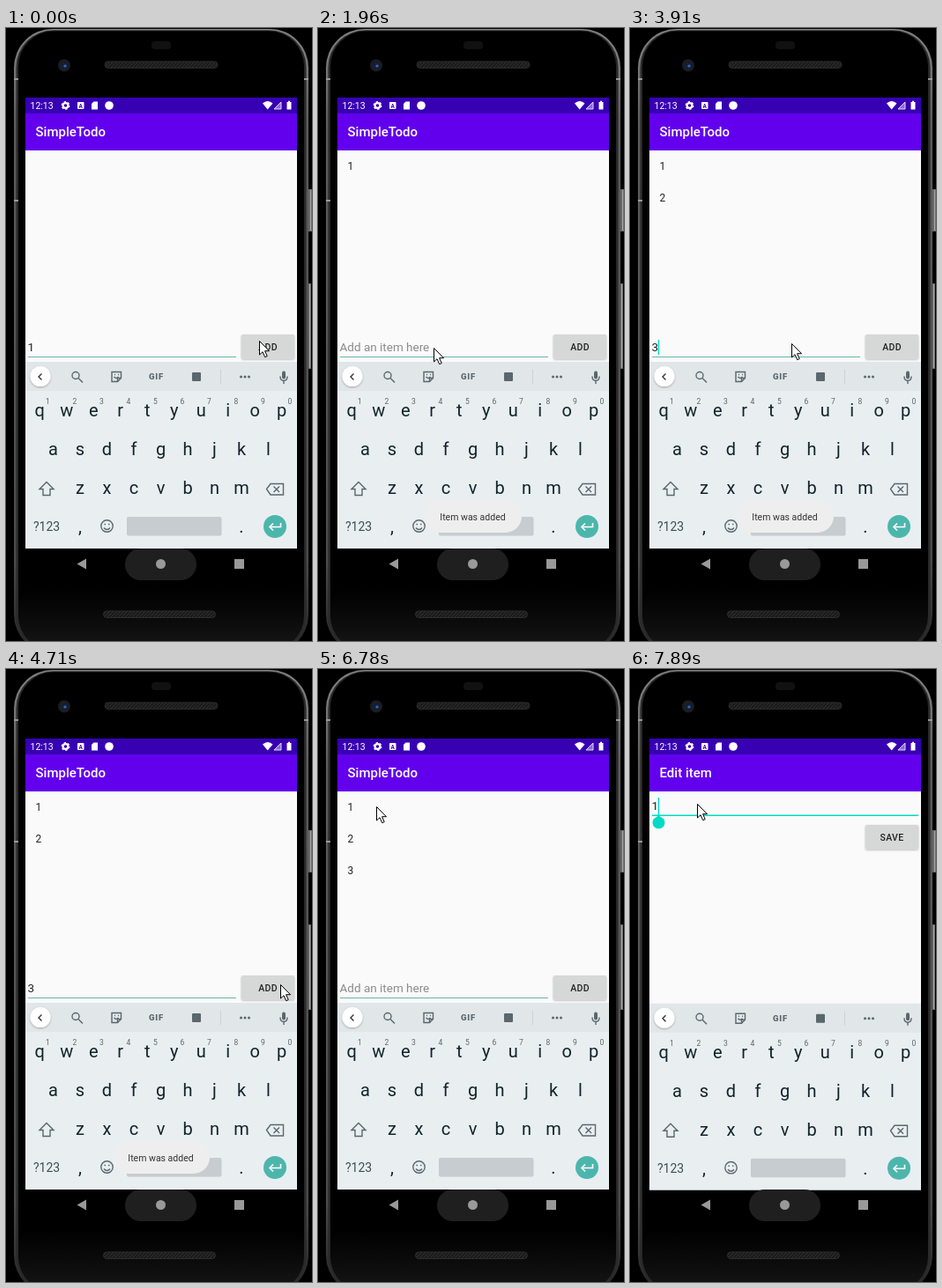
Animation of 347x696 px, one loop 8 s. Source, as an HTML page:

```html
<!DOCTYPE html>
<html lang="en">
<head>
<meta charset="utf-8">
<title>Todo app demo</title>
<style>
html, body { margin: 0; width: 100%; height: 100%; overflow: hidden; background: #000; }
svg { display: block; width: 347px; height: 696px; font-family: Roboto, sans-serif; }
.mid { text-anchor: middle; }
.btn { font-weight: 500; font-size: 10.5px; letter-spacing: .3px; text-anchor: middle; fill: #222; }
.title { font-weight: 500; font-size: 15px; fill: #fff; }
.input { font-size: 13.5px; fill: #222; }
.line { fill: none; stroke: #5a676d; stroke-width: 1.4; }
</style>
</head>
<body>
<svg viewBox="0 0 347 696">
  <defs>
    <clipPath id="screen"><path d="M22 79H330V603H22Z"/></clipPath>
    <clipPath id="keysArea"><path d="M22 79H330V592H22Z"/></clipPath>
    <linearGradient id="rim" x2="0" y2="1">
      <stop offset="0" stop-color="#858585"/><stop offset=".15" stop-color="#5c5c5c"/>
      <stop offset=".85" stop-color="#4a4a4a"/><stop offset="1" stop-color="#222"/>
    </linearGradient>
    <linearGradient id="face" x2="0" y2="1">
      <stop offset=".9" stop-color="#000"/><stop offset="1" stop-color="#161616"/>
    </linearGradient>
    <pattern id="mesh" width="4" height="4" patternUnits="userSpaceOnUse">
      <path d="M0 0H4V4H0Z" fill="#1b1b1b"/><path d="M0 4L4 0" stroke="#303030"/>
    </pattern>
    <filter id="soft" x="-20%" y="-20%" width="140%" height="150%">
      <feDropShadow dx="0" dy="1" stdDeviation=".8" flood-opacity=".3"/>
    </filter>
    <g id="bars">
      <path d="M22 79H330V591H22Z" fill="#fafafa"/>
      <path d="M22 79H330V139H22Z" fill="#6200ee"/>
      <path d="M22 79H330V97H22Z" fill="#3700b3"/>
    </g>
  </defs>

  <!-- phone -->
  <path d="M0 0H347V696H0Z"/>
  <path d="M343 183h4v48h-4zM342 290h4v97h-4z" fill="#6a6a6a"/>
  <path d="M345.5 184v46M344.5 291v95" stroke="#aaa"/>
  <rect x="9" y="1" width="334" height="709" rx="44" fill="url(#rim)"/>
  <rect x="11.5" y="2.5" width="329" height="706" rx="42" fill="#2a2a2a"/>
  <rect x="14" y="3.5" width="324" height="704" rx="40" fill="url(#face)"/>
  <path d="M9 58h5M9 196h5M338 58h5" stroke="#999" stroke-width="2"/>
  <rect x="165" y="15" width="22" height="9" rx="4" fill="#111"/>
  <rect x="112" y="38" width="128" height="7.5" rx="3.7" fill="url(#mesh)" stroke="#2c2c2c"/>
  <rect x="110.5" y="662" width="127" height="7.5" rx="3.7" fill="url(#mesh)" stroke="#2c2c2c"/>
  <circle cx="66" cy="42.5" r="7" fill="#1d1d1f"/>
  <circle cx="66" cy="42.5" r="3.8" fill="#10203f"/><circle cx="67" cy="43" r="1.6" fill="#3f66b5"/>

  <g clip-path="url(#screen)">
    <g id="list">
      <use href="#bars"/>
      <text class="title" x="33.5" y="123">SimpleTodo</text>
      <g id="items" font-size="12" fill="#222"></g>
      <text id="entry" class="input" x="24.5" y="367"></text>
      <path d="M25 373.5H261" stroke="#66b5af"/>
      <path id="caret" d="M32.5 354V371" stroke="#03dac5" stroke-width="1.5"/>
      <rect id="add" x="267" y="348" width="60" height="27.5" rx="1.5" fill="#d6d7d7" filter="url(#soft)"/>
      <text class="btn" x="297" y="365.5">ADD</text>
    </g>
    <g id="edit">
      <path d="M22 590H330V627H22Z"/>
      <use href="#bars"/>
      <text class="title" x="33.5" y="123">Edit item</text>
      <text class="input" x="24.5" y="160">1</text>
      <path id="rule" d="M25 166.3H327"/>
      <path id="editCaret" d="M32.5 146V166" stroke="#03dac5" stroke-width="1.5"/>
      <path id="handle" d="M32.5 166.5L38 170A7 7 0 1 1 27 170Z" fill="#03dac5"/>
      <rect x="267" y="177" width="60" height="27.5" rx="1.5" fill="#d6d7d7" filter="url(#soft)"/>
      <text class="btn" x="297" y="194.5">SAVE</text>
    </g>
  </g>

  <!-- status icons -->
  <g fill="#fff">
    <text x="27.5" y="92" font-size="10.5">12:13</text>
    <circle cx="67.5" cy="88" r="2.9" fill="none" stroke="#fff" stroke-width="2.2"/>
    <circle cx="67.5" cy="88" r="4.2" fill="none" stroke="#fff" stroke-width="1.4" stroke-dasharray="2.2 2.2"/>
    <rect x="81" y="84" width="7.5" height="8" rx="1"/>
    <text class="mid" x="84.7" y="90.5" font-size="6.5" font-weight="700" fill="#3700b3">A</text>
    <path d="M99.500 83.500H104V92.500H97V86Z"/>
    <circle cx="117" cy="88" r="4.8"/>
    <path d="M291 85.5Q296.700 80.500 302.500 85.500L296.700 92.500ZM318.500 84h1.500v-1.200h2V84h1.500v8.500h-5z"/>
    <path d="M304 92L312 84V92Z" fill="#8a6ad2" stroke="#fff" stroke-width=".8"/>
  </g>

  <g clip-path="url(#keysArea)">
    <g id="keyboard">
      <path d="M22 379H330V591H22Z" fill="#e9eef1"/>
      <path d="M22 379H330V412H22Z" fill="#e1e6e9"/>
      <circle cx="39" cy="395.5" r="11.5" fill="#fff" filter="url(#soft)"/>
      <g class="line">
        <path d="M40.5 392.5L37 396L40.5 399.5" stroke="#333"/>
        <circle cx="79" cy="394.5" r="4"/><path d="M82 397.5L87 402.5"/>
        <path d="M120 390.500H130.500V397.500L126.500 401.500H120ZM126.500 401V397.500H130"/>
        <path d="M122.500 396Q125 399 127.500 396M123 393.500h1M127 393.500h1"/>
        <path d="M243.500 388V404" stroke="#ccd2d5" stroke-width="1"/>
        <path d="M311 395.500Q311 400.500 315 400.500T319 395.500M315 400.500V404"/>
        <path d="M46 515.500L54 523.500H50V530.500H42V523.500H38Z"/>
        <path d="M295.500 523.500L300 517.500H314.500V530H300ZM303.500 520.500L310 527M310 520.500L303.500 527"/>
        <circle cx="114.5" cy="565.5" r="6.7"/>
        <path d="M111 567.500Q114.500 571.500 118 567.500M111.500 563.500h1.500M116 563.500h1.500"/>
      </g>
      <g fill="#5a676d">
        <text class="mid" x="170.5" y="399.3" font-size="9.5" font-weight="900" letter-spacing=".8">GIF</text>
        <rect x="211" y="391" width="10" height="10" rx="1"/>
        <circle cx="266.5" cy="396" r="1.5"/><circle cx="271" cy="396" r="1.5"/><circle cx="275.5" cy="396" r="1.5"/>
        <rect x="313" y="389.5" width="4" height="9" rx="2"/>
        <text x="31" y="571" font-size="14" fill="#3f4d53">?123</text>
      </g>
      <g id="keys" class="mid" font-size="20" fill="#10242b"></g>
      <rect x="137" y="555" width="107.5" height="21.5" rx="2" fill="#c7ccd0"/>
      <circle cx="305" cy="566" r="13" fill="#4db6ac"/>
      <path d="M311.5 562V566.5H299.5M303 562.5L299 566.5L303 570.5" fill="none" stroke="#fff" stroke-width="1.6"/>
    </g>
  </g>

  <g id="toast">
    <rect x="120" y="536" width="111" height="37" rx="18.5" fill="#eeeeee"/>
    <text id="toastText" class="mid" x="175.5" y="558.5" font-size="10.5" fill="#333">Item was added</text>
  </g>

  <!-- navigation -->
  <rect x="135" y="591" width="81" height="36" rx="18" fill="#1f1f1f"/>
  <path d="M80.5 608.5L91 602.5V614.5ZM259 603h11v11h-11z" fill="#999"/>
  <circle cx="175.5" cy="608.5" r="5.5" fill="#999"/>

  <path id="mouse" d="M.5 .5V16L4 12.700L6.700 18.700L9.200 17.600L6.600 11.700H11.500Z" fill="#fff" stroke="#000"/>
</svg>
<script>
const $ = id => document.getElementById(id);
const clamp = v => Math.min(1, Math.max(0, v));
const easeOut = p => 1 - (1 - p) ** 3;
const within = (t, spans) => spans.some(([a, b]) => t >= a && t < b);
const show = (id, v) => $(id).setAttribute('opacity', +v);
const move = (id, v) => $(id).setAttribute('transform', v);
const label = (x, y, s, extra = '') => `<text x="${x}" y="${y}" ${extra}>${s}</text>`;

const updates = [[0, 0, 1], [440, 1410, 8], [1560, 1560, 1], [1960, 1960, 1], [2110, 2350, 3],
  [2630, 3290, 6], [3660, 3910, 2], [4160, 4580, 4], [4710, 5570, 7], [5850, 6490, 6],
  [6780, 6930, 2], [7070, 7760, 6], [7890, 7890, 1]];
const ticks = updates.flatMap(([a, b, n]) =>
  Array.from({ length: n }, (_, i) => n > 1 ? a + (b - a) * i / (n - 1) : a));

// time, x, y
const mousePath = [[0, 287, 355], [850, 287, 355], [1410, 134, 364], [1560, 131, 363],
  [2110, 131, 363], [2350, 306, 357], [3000, 306, 357], [3660, 183, 358], [4160, 183, 358],
  [4580, 311, 358], [5000, 311, 358], [5570, 266, 302], [6490, 66, 156],
  [7220, 66, 156], [7490, 76, 153], [8000, 76, 153]];
const added = [700, 2880, 4980];
const typed = [[0, 700, '1'], [2110, 2880, '2'], [3910, 4980, '3']];
const caretOn = [[700, 1130], [1560, 1960], [2110, 2610], [2880, 3280], [3660, 4430], [4980, 5420], [5850, 6350]];

function mouseAt(t) {
  const i = mousePath.findIndex(k => k[0] > t);
  const [a, ax, ay] = mousePath[i - 1], [b, bx, by] = mousePath[i];
  const p = (t - a) / (b - a);
  return [ax + (bx - ax) * p, ay + (by - ay) * p].map(Math.round);
}

function row(chars, x, y, extra) {
  return [...chars].map((c, i) => label(x + i * 30.5, y, c, extra)).join('');
}
$('keys').innerHTML = row('qwertyuiop', 38.2, 441) + row('asdfghjkl', 53.5, 485) +
  row('zxcvbnm', 84, 529) + label(84, 573, ',') + label(267, 573, '.') +
  row('1234567890', 47.5, 427, 'font-size="8.5" fill="#59666c"');
$('items').innerHTML = added.map((_, i) => label(33.5, 161 + i * 36, i + 1)).join('');

function scaled(s) {
  return `translate(176 335) scale(${s}) translate(-176 -335)`;
}

function draw(t) {
  added.forEach((at, i) => $('items').children[i].setAttribute('opacity', +(t >= at)));

  const entry = typed.find(([a, b]) => t >= a && t < b);
  $('entry').textContent = entry ? entry[2] : 'Add an item here';
  $('entry').style.fill = entry ? '#222' : '#8c8c8c';
  show('caret', within(t, caretOn));
  move('caret', `translate(${entry ? 0 : -7.5})`);
  $('add').setAttribute('fill', within(t, added.map(a => [a - 130, a + 130])) ? '#c3c4c4' : '#d6d7d7');

  // switch to the edit page
  const open = easeOut(clamp((t - 6860) / 345));
  move('list', scaled(1 + .053 * open));
  move('edit', scaled(.9 + .1 * open));
  show('edit', clamp(open * 1.6));
  const focus = t >= 7300;
  $('rule').setAttribute('stroke', focus ? '#03dac5' : '#8a8a8a');
  $('rule').setAttribute('stroke-width', focus ? 1.6 : .9);
  show('editCaret', focus);
  show('handle', focus);

  const hide = clamp((t - 6780) / 260);
  const rise = easeOut(clamp((t - 7470) / 520));
  move('keyboard', `translate(0 ${focus ? 100 * (1 - rise) : 213 * hide})`);
  show('keyboard', focus ? clamp(rise * 1.05) : hide < 1);

  const fading = .65 * clamp((t - 6850) / 220) * clamp((7360 - t) / 200);
  show('toast', t < 6780 ? clamp((t - 750) / 300) : fading);
  const dip = at => clamp(Math.abs(t - at) / 150);
  show('toastText', Math.min(dip(2950), dip(5050)));

  move('mouse', `translate(${mouseAt(t)})`);
}

function frame(now) {
  const t = now % 8000;
  draw(ticks.filter(k => k <= t).pop());
  requestAnimationFrame(frame);
}
draw(0);
requestAnimationFrame(frame);
</script>
</body>
</html>
```
